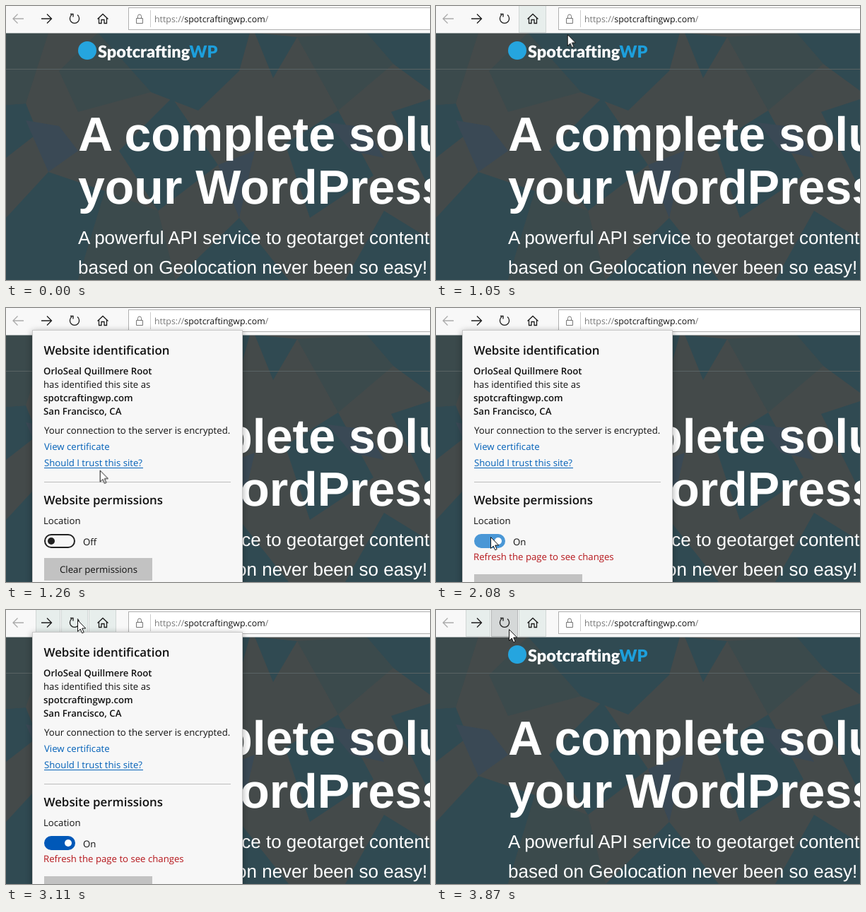
Recreate the animation shown at these times as an HTML page. Size 600x388 px, loop 3900 ms.

```html
<!DOCTYPE html>
<html lang="en">
<head>
<meta charset="utf-8">
<title>Site permissions</title>
<style>
html, body { margin: 0; width: 100%; height: 100%; overflow: hidden; }
svg { display: block; width: 600px; height: 388px; }
text { text-rendering: geometricPrecision; white-space: pre; }

.hero { fill: #fff; font-family: "Liberation Sans", Arial, sans-serif; }
.title { font-size: 68px; font-weight: 700; }
.lead { font-size: 26px; }
.brand { font: 900 23.5px Lato, sans-serif; fill: #fff; }
.ui { font: 13.2px "Open Sans", "Noto Sans", sans-serif; fill: #111; }
.strong { font-weight: 600; }
.head { font-size: 16.9px; font-weight: 600; }
.url { font-size: 12.4px; }
.link { fill: #0060b8; }
.icon { fill: none; stroke: #1c1c1c; stroke-width: 1.3; }
.tint { fill: #e7eeec; stroke: #d0d6d5; }

.teal { fill: #304a52; }
.slate { fill: #3a4955; }
.dim { fill: #3b4a4c; }

/* one shared loop for every moving part */
.cursor, .panel, .hover, .home, .press, .on, .off, .knob, .track, .clear {
  animation: 3.9s linear infinite;
}
.cursor { animation-name: travel; }
.panel { animation-name: panel; }
.hover { animation-name: hover; }
.home { animation-name: home; }
.press { animation-name: press; }
.on { animation-name: on; }
.off { animation-name: off; }
.knob { animation-name: knob; }
.track { animation-name: track; }
.clear { animation-name: clear; }
.hover, .home, .press, .on, .off, .clear { animation-timing-function: step-end; }

@keyframes travel {
  0%, 4.87% { transform: translate(610px, 131px); }
  10.26% { transform: translate(390px, 86px); }
  15.9% { transform: translate(106px, 16px); }
  17.95% { transform: translate(133px, 15px); }
  18.72%, 24.62% { transform: translate(190px, 16px); }
  26.92% { transform: translate(186px, 39px); }
  32.31% { transform: translate(133px, 229px); animation-timing-function: ease-out; }
  38% { transform: translate(86px, 311px); animation-timing-function: ease-out; }
  42%, 53.9% { transform: translate(77px, 324px); }
  58.97% { transform: translate(112px, 347px); }
  65.9% { transform: translate(143px, 325px); }
  73.08% { transform: translate(148px, 175px); animation-timing-function: ease-out; }
  79.74%, 93.08% { transform: translate(101px, 14px); }
  99.23%, 100% { transform: translate(103px, 27px); }
}
@keyframes panel {
  0%, 27.69% { opacity: 0; transform: translateY(-5px); }
  29.6%, 82.3% { opacity: 1; transform: none; }
  83.1%, 100% { opacity: 0; transform: none; }
}
@keyframes hover { 0% { opacity: 0; } 77%, 100% { opacity: 1; } }
@keyframes home {
  0% { opacity: 0; }
  16.5% { opacity: 1; }
  28.5% { opacity: 0; }
  77%, 100% { opacity: 1; }
}
@keyframes press { 0% { opacity: 0; } 82.3%, 100% { opacity: 1; } }
@keyframes on { 0% { opacity: 0; } 45%, 100% { opacity: 1; } }
@keyframes off { 0% { opacity: 1; } 45%, 100% { opacity: 0; } }
@keyframes knob {
  0%, 44.6% { transform: none; fill: #222; }
  47%, 100% { transform: translateX(24px); fill: #fff; }
}
@keyframes track {
  0%, 44.6% { fill: #f7f7f7; stroke: #222; }
  45.4%, 56% { fill: #4a97d6; stroke: #4a97d6; }
  58%, 100% { fill: #0058b8; stroke: #0058b8; }
}
@keyframes clear { 0% { transform: none; } 45%, 100% { transform: translateY(23px); } }
</style>
</head>
<body>
<svg viewBox="0 0 600 388">
  <defs>
    <filter id="shade" x="-10%" y="-10%" width="120%" height="120%">
      <feDropShadow dx="0" dy="2" stdDeviation="5" flood-opacity=".35"/>
    </filter>
  </defs>

  <!-- page -->
  <rect y="38" width="600" height="350" fill="#444a4a"/>
  <path class="teal" d="M130 38H345L330 92 272 148 205 122ZM0 140L28 138 45 180 0 215ZM0 300L60 235 140 262 102 388H0ZM510 38H600V120L548 82ZM352 38L412 44 378 102ZM395 195L470 148 520 240 430 300ZM160 205L235 130 300 225 215 290ZM545 150L600 132V260ZM240 388L330 300 400 388ZM480 388L535 290 600 330V388Z"/>
  <path class="slate" d="M28 162L75 170 102 205 60 235ZM455 165L510 172 535 215 488 205ZM300 225L352 205 330 300Z"/>
  <path class="dim" d="M0 38L60 38 28 138 0 140ZM75 92L130 38 205 122 102 150ZM412 44L510 38 548 82 470 148ZM140 262L215 290 240 388H102Z"/>
  <path d="M0 89.5H600" stroke="#596364"/>
  <circle cx="115" cy="63" r="13" fill="#25a5df"/>
  <text class="brand" x="130" y="73">Spotcrafting<tspan fill="#1d9fdc">WP</tspan></text>
  <g class="hero">
    <text class="title" x="102" y="205">A complete solution</text>
    <text class="title" x="102" y="280">your WordPress site</text>
    <text class="lead" x="102" y="337">A powerful API service to geotarget content</text>
    <text class="lead" x="102" y="379">based on Geolocation never been so easy!</text>
  </g>

  <!-- toolbar -->
  <rect width="600" height="38.5" fill="#f8f8f8"/>
  <rect class="tint hover" x="42.5" y="-.5" width="34" height="38"/>
  <rect class="tint hover" x="78.5" y="-.5" width="37" height="38"/>
  <rect class="press" x="78.5" y="-.5" width="37" height="38" fill="#d5d8d8" stroke="#b2b5b5"/>
  <rect class="tint home" x="117.5" y="-.5" width="38" height="38"/>
  <path class="icon" d="M25 18H10M16.5 11.5L10 18 16.5 24.5" style="stroke:#aaa"/>
  <path class="icon" d="M50 18H64.500M58 11.500L64.500 18 58 24.500"/>
  <path class="icon" d="M93 12.600A6.600 6.600 0 1 0 101 12.600M91 11.500H95V15.500"/>
  <path class="icon" d="M129.500 18.500L137 11.500 144.500 18.500M131.500 17V24.500H135V19.500H139V24.500H142.500V17"/>
  <rect x="173.500" y="2.500" width="440" height="31" fill="#fff" stroke="#b0b0b0"/>
  <path class="icon" d="M184.500 17.500H193.500V24.500H184.500ZM186.500 17.500V14.500A2.500 2.500 0 0 1 191.500 14.500V17.500" style="stroke:#777;stroke-width:1"/>
  <path d="M204.500 6V30" stroke="#ccc"/>
  <text class="ui url" x="210" y="23"><tspan fill="#777">https://</tspan>spotcraftingwp.com<tspan fill="#777">/</tspan></text>

  <!-- site information -->
  <g class="panel">
    <rect x="37.500" y="31.500" width="297" height="380" fill="#f7f7f7" stroke="#c9c9c9" filter="url(#shade)"/>
    <g class="ui">
      <text class="head" x="53.500" y="66">Website identification</text>
      <text class="strong" x="53" y="94">OrloSeal Quillmere Root</text>
      <text x="53" y="113">has identified this site as</text>
      <text class="strong" x="53" y="132">spotcraftingwp.com</text>
      <text class="strong" x="53" y="151">San Francisco, CA</text>
      <text x="54" y="178">Your connection to the server is encrypted.</text>
      <text class="link" x="54" y="201">View certificate</text>
      <text class="link" x="54" y="224">Should I trust this site?</text>
      <path d="M54 226.500H194" stroke="#0060b8"/>
      <path d="M54 246.500H318" stroke="#bdbdbd"/>
      <text class="head" x="53.500" y="278">Website permissions</text>
      <text x="53" y="306">Location</text>
      <rect class="track" x="55" y="321" width="42" height="18" rx="9" stroke-width="2"/>
      <circle class="knob" cx="64" cy="330" r="5"/>
      <text class="off" x="109" y="336">Off</text>
      <text class="on" x="109" y="336">On</text>
      <g class="on"><text x="53" y="357" fill="#b5161b">Refresh the page to see changes</text></g>
      <g class="clear">
        <rect x="54" y="354" width="153" height="32" fill="#c2c2c2"/>
        <text x="76" y="375">Clear permissions</text>
      </g>
    </g>
  </g>

  <path class="cursor" d="M.5 .5V16.500L4.200 13 6.700 18.700 9.200 17.600 6.700 12H11.700Z" fill="#fff" stroke="#111"/>
</svg>
</body>
</html>
```
